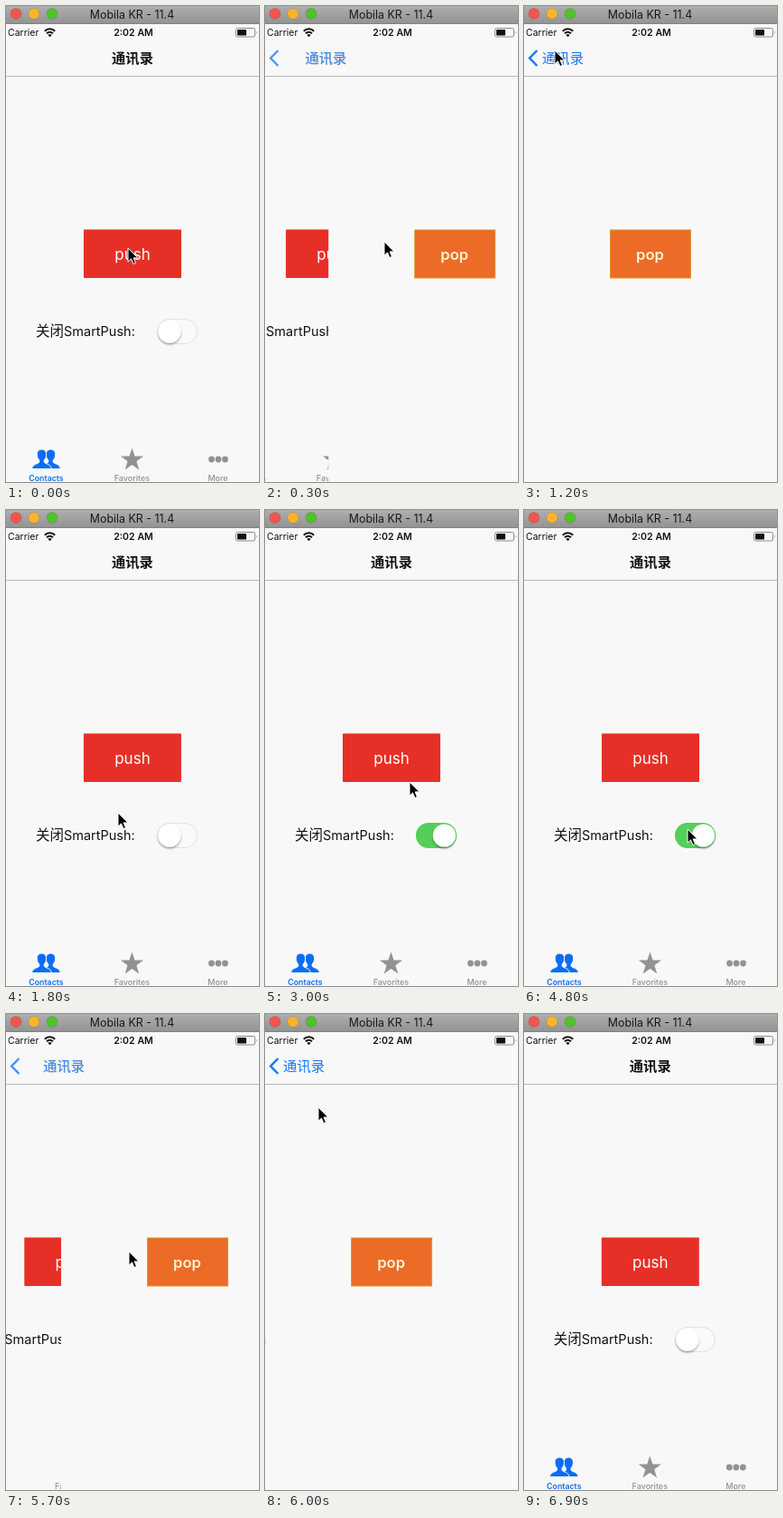
An HTML page that plays this animation: 280 px wide and 525 px high, repeating every 7.2 s.

```html
<!DOCTYPE html>
<html lang="zh">
<head>
<meta charset="utf-8">
<title>Navigation demo</title>
<style>
  html, body { margin: 0; width: 100%; height: 100%; overflow: hidden; background: #f8f8f8; }
  svg { display: block; width: 100%; height: 100%; }
  text { font-family: Inter, "Noto Sans CJK SC", "Noto Sans CJK", sans-serif; }
  .mid { text-anchor: middle; }
  .tab { font-size: 9px; font-weight: 500; text-anchor: middle; fill: #929292; }
  .nav { font-size: 15.3px; font-family: "Noto Sans CJK SC", "Noto Sans CJK", sans-serif; text-anchor: middle; }
</style>
</head>
<body>
<svg viewBox="0 0 280 525">
  <defs>
    <linearGradient id="bar" x2="0" y2="1">
      <stop stop-color="#aeaeae"/><stop offset="1" stop-color="#929292"/>
    </linearGradient>
    <filter id="soft" x="-50%" y="-50%" width="200%" height="200%">
      <feDropShadow dx="0" dy="1.6" stdDeviation="1.1" flood-opacity=".38"/>
    </filter>
    <path id="person" d="M0 -11.500C3.600 -11.500 5.300 -9 5.200 -5.600C5.100 -2.800 4 -1 2.700 .4V2.600C3.500 4.700 10.500 4.500 10.800 10H-10.800C-10.500 4.500 -3.500 4.700 -2.700 2.600V.4C-4 -1 -5.100 -2.800 -5.200 -5.600C-5.300 -9 -3.600 -11.500 0 -11.500Z"/>
  </defs>
  <rect width="280" height="525" fill="#f8f8f8"/>

  <g id="home">
    <rect x="86" y="246.500" width="108" height="53.500" rx="1" fill="#e63027"/>
    <text class="mid" x="140" y="280" font-size="17" fill="#fff">push</text>
    <text x="33" y="364" font-size="15.5" fill="#111">关闭</text>
    <text x="64" y="363.500" font-size="14.5" fill="#111">SmartPush:</text>
    <rect x="167.500" y="345.500" width="44" height="27" rx="13.5" fill="#fafafa" stroke="#e2e2e2"/>
    <rect id="green" x="167" y="345" width="45" height="28" rx="14" fill="#54cf59"/>
    <circle id="knob" cy="359" r="12.6" fill="#fff" filter="url(#soft)"/>
  </g>

  <g id="tabs">
    <rect y="483" width="280" height="42" fill="#f8f8f8"/>
    <g fill="#0c6cf6" stroke="#f8f8f8">
      <use href="#person" x="49.500" y="500.500"/>
      <use href="#person" x="39.500" y="500.500"/>
    </g>
    <text class="tab" x="44.500" y="523.500" style="font-size:8.8px;font-weight:600;fill:#0c6cf6">Contacts</text>
    <path id="star" fill="#929292"/>
    <text class="tab" x="139.500" y="523.500">Favorites</text>
    <g fill="#929292">
      <circle cx="227.500" cy="500" r="3.4"/><circle cx="235" cy="500" r="3.4"/><circle cx="242.500" cy="500" r="3.4"/>
    </g>
    <text class="tab" x="234.500" y="523.500">More</text>
  </g>

  <g id="detail">
    <rect id="sheet" y="78" width="280" fill="#f8f8f8"/>
    <rect x="95.500" y="247" width="89" height="53" fill="#eb6b27" stroke="#e2962f"/>
    <text class="mid" x="139.500" y="280" font-size="16.6" font-weight="600" fill="#fff4d6">pop</text>
  </g>

  <rect y="20" width="280" height="57" fill="#f8f8f8"/>
  <path d="M0 77.500H280" stroke="#b8b8b8"/>
  <text id="heading" class="nav" y="63" font-weight="700" fill="#111">通讯录</text>
  <g id="back">
    <path d="M14.500 49L6.200 57.500L14.500 66" fill="none" stroke="#147afc" stroke-width="2.5"/>
    <text id="backText" class="nav" y="63" fill="#147afc">通讯录</text>
  </g>

  <text x="2" y="33" font-size="10.5" fill="#111">Carrier</text>
  <g fill="none" stroke="#111" stroke-width="2">
    <path d="M42.800 27.700A8 8 0 0 1 54.200 27.700"/>
    <path d="M45 30.300A5 5 0 0 1 52 30.300"/>
  </g>
  <path d="M46.400 32A3 3 0 0 1 50.600 32L48.500 34.300Z" fill="#111"/>
  <text class="mid" x="141" y="33" font-size="10.6" font-weight="600" fill="#111">2:02 AM</text>
  <rect x="254.500" y="24.500" width="21" height="9.500" rx="2" fill="none" stroke="#8c8c8c"/>
  <rect x="256" y="26" width="10" height="6.500" rx=".8" fill="#111"/>
  <path d="M277 27.500Q278.600 29.200 277 31Z" fill="#8c8c8c"/>

  <rect width="280" height="20" fill="url(#bar)"/>
  <path d="M0 19.500H280" stroke="#828282"/>
  <g stroke-opacity=".18" stroke="#000" stroke-width=".6">
    <circle cx="11" cy="8.500" r="6" fill="#f4544d"/>
    <circle cx="31" cy="8.500" r="6" fill="#fab42c"/>
    <circle cx="51" cy="8.500" r="6" fill="#52c22b"/>
  </g>
  <text class="mid" x="139.500" y="14" font-size="12.4" fill="#1a1a1a">Mobila KR - 11.4</text>

  <path id="cursor" d="M0 0V15.200L3.500 11.900L5.900 17.500L8.500 16.400L6.100 10.900H11Z" fill="#000" stroke="#fff" stroke-width="1"/>
</svg>
<script>
const LOOP = 7200, STEP = 300, WIDTH = 280;
const $ = id => document.getElementById(id);

// [start ms, direction]: +1 opens the detail page, -1 returns home
const slides = [[188, 1], [1383, -1], [3270, 1], [3808, -1], [5580, 1], [6558, -1]];
const toggles = [[2640, 1], [5040, -1]];
// [ms, x, y] of the pointer tip
const path = [
  [0, 135, 267], [300, 132, 260], [900, 40, 53], [1200, 34, 49], [1500, 48, 95],
  [1800, 124, 334], [2100, 170, 352], [2400, 182, 354], [2700, 182, 354],
  [3000, 160, 300], [3300, 148, 263], [3900, 148, 262], [4200, 154, 288],
  [4800, 181, 352], [5100, 181, 352], [5400, 146, 276], [5700, 136, 262],
  [6000, 59, 103], [6300, 36, 50], [6600, 38, 53]
];

const spring = d => d <= 0 ? 0 : 1 - (1 + .024 * d) * Math.exp(-.024 * d);
const level = (list, t) => list.reduce((sum, [start, dir]) => sum + dir * spring(t - start), 0);
const mix = (a, b, k) => a + (b - a) * k;
const shift = (id, x, y = 0) => $(id).setAttribute('transform', `translate(${x} ${y})`);

function pointer(t) {
  const i = path.findIndex(key => key[0] > t);
  if (i < 0) return path[path.length - 1].slice(1);
  const [t0, x0, y0] = path[i - 1], [t1, x1, y1] = path[i];
  const k = (t - t0) / (t1 - t0);
  return [mix(x0, x1, k), mix(y0, y1, k)];
}

function draw(t) {
  const open = level(slides, t), on = level(toggles, t);
  const keepTabs = t >= 2700 && t < 5100;
  const drift = -.3 * WIDTH * open;

  shift('home', drift);
  shift('tabs', keepTabs ? 0 : drift);
  shift('detail', WIDTH * (1 - open));
  $('sheet').setAttribute('height', keepTabs ? 405 : 447);

  const titleX = mix(140, 43, open);
  $('heading').setAttribute('x', titleX);
  $('heading').setAttribute('opacity', 1 - open);
  $('backText').setAttribute('x', titleX);
  $('back').setAttribute('opacity', open);

  $('green').setAttribute('opacity', on);
  $('knob').setAttribute('cx', mix(181, 198.5, on));

  shift('cursor', ...pointer(t));
  $('cursor').setAttribute('visibility', t < 6900 ? 'visible' : 'hidden');
}

const points = Array.from({ length: 10 }, (_, i) => {
  const r = i % 2 ? 5.2 : 13.2, a = i * Math.PI / 5;
  return `${139.5 + r * Math.sin(a)} ${500.7 - r * Math.cos(a)}`;
});
$('star').setAttribute('d', `M${points.join('L')}Z`);

const begin = performance.now();
function tick() {
  const t = (performance.now() - begin) % LOOP;
  draw(Math.floor(t / STEP) * STEP);
  requestAnimationFrame(tick);
}
draw(0);
requestAnimationFrame(tick);
</script>
</body>
</html>
```
